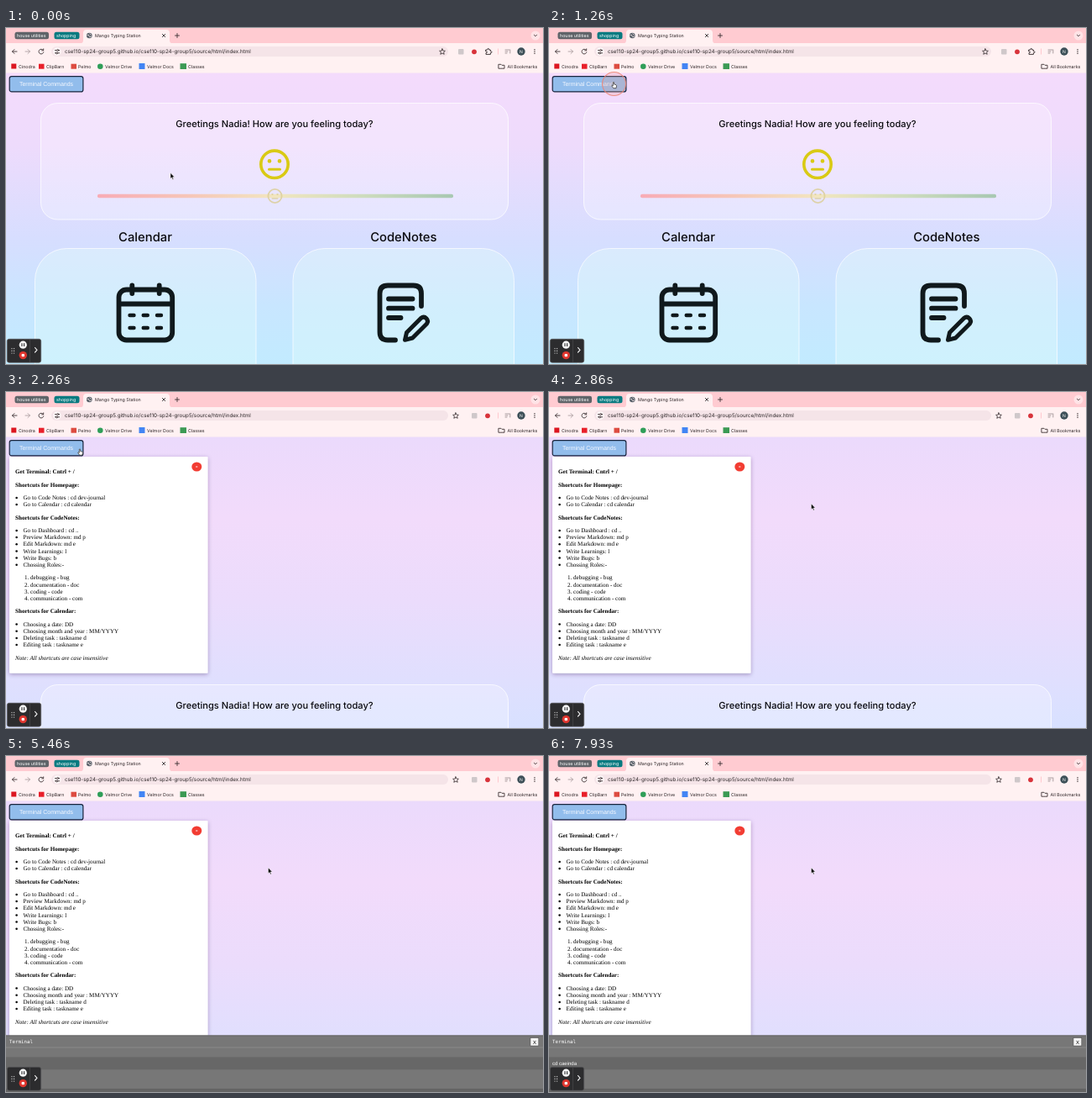
Animation, 640 px wide and 400 px high, one loop 8000 ms. Source, as an HTML page:

```html
<!DOCTYPE html>
<html lang="en">
<head>
<meta charset="utf-8">
<title>Terminal shortcuts</title>
<style>
html, body { margin: 0; width: 100%; height: 100%; overflow: hidden; background: #fff1f2; }
svg { position: absolute; left: 0; top: 0; display: block; }
text { white-space: pre; text-rendering: geometricPrecision; }
.ui { font-family: Inter, Roboto, sans-serif; font-size: 5.3px; fill: #2c2527; }
.head { font-family: Inter, "Open Sans", sans-serif; font-weight: 500; fill: #0b0b0f; text-anchor: middle; }
.arial { font-family: "Liberation Sans", Arial, sans-serif; }
.serif { font-family: "Liberation Serif", "Times New Roman", serif; font-size: 7.1px; fill: #000; }
.mono { font-family: "DejaVu Sans Mono", monospace; font-size: 5.8px; fill: #fff; }
.line { fill: none; stroke-linecap: round; stroke-linejoin: round; }
</style>
</head>
<body>
<svg id="stage" width="640" height="400" viewBox="0 0 640 400">
  <defs>
    <linearGradient id="home" gradientUnits="userSpaceOnUse" x1="0" y1="53" x2="0" y2="400">
      <stop offset="0" stop-color="#f4dbfc"/><stop offset=".25" stop-color="#eedbfc"/>
      <stop offset=".57" stop-color="#d7deff"/><stop offset=".8" stop-color="#c8e6ff"/>
      <stop offset="1" stop-color="#c2ebff"/>
    </linearGradient>
    <linearGradient id="tall" gradientUnits="userSpaceOnUse" x1="0" y1="53" x2="0" y2="400">
      <stop offset="0" stop-color="#ebdafc"/><stop offset=".28" stop-color="#f2dbfb"/>
      <stop offset=".57" stop-color="#ebdcfc"/><stop offset=".83" stop-color="#e0dffe"/>
      <stop offset="1" stop-color="#d8e1ff"/>
    </linearGradient>
    <linearGradient id="mood" gradientUnits="userSpaceOnUse" x1="109" y1="0" x2="533" y2="0">
      <stop offset="0" stop-color="#f8acb6"/><stop offset=".25" stop-color="#f6c5b8"/>
      <stop offset=".5" stop-color="#f2e6c0"/><stop offset=".75" stop-color="#cddcbe"/>
      <stop offset="1" stop-color="#a8c8b2"/>
    </linearGradient>
    <filter id="shadow" x="-10%" y="-10%" width="120%" height="120%">
      <feDropShadow dx="0" dy="1.5" stdDeviation="2.5" flood-color="#302050" flood-opacity=".35"/>
    </filter>
    <g id="face" fill="currentColor" stroke="currentColor">
      <circle r="16.2" fill="none" stroke-width="3.6"/>
      <g stroke="none"><circle cx="-6" cy="-3.900" r="2.300"/><circle cx="6" cy="-3.900" r="2.300"/></g>
      <path d="M-6.500 6H6.500" stroke-width="3" stroke-linecap="round"/>
    </g>
  </defs>

  <rect id="bg" y="53" width="640" height="347"/>

  <g id="page">
    <rect x="41.5" y="89.5" width="557" height="138.5" rx="20" fill="#fff" fill-opacity=".25" stroke="#fff" stroke-opacity=".75"/>
    <g fill="#e4fcf8" fill-opacity=".36" stroke="#fff" stroke-opacity=".7">
      <rect x="34.5" y="262.5" width="263.5" height="190" rx="38"/>
      <rect x="342" y="262.5" width="263.5" height="190" rx="38"/>
    </g>
    <text class="head" x="320" y="118" font-size="11.1">Greetings Nadia! How are you feeling today?</text>
    <use href="#face" transform="translate(320 162.300)" color="#d9ca14"/>
    <rect x="109" y="197.8" width="424" height="4.4" rx="2" fill="url(#mood)"/>
    <use href="#face" transform="translate(320.500 200) scale(.5)" color="#dccf9c" opacity=".85"/>
    <text class="head" x="166" y="254" font-size="14.8">Calendar</text>
    <text class="head" x="473.800" y="254" font-size="14.8">CodeNotes</text>
    <g class="line" stroke="#10191c" stroke-width="5.8">
      <rect x="134.500" y="311.500" width="63.700" height="60" rx="9"/>
      <path d="M135 328.500H198M150.300 306.500V316M182.700 306.500V316"/>
      <path stroke-width="4.4" d="M147.500 342H152.500M163.700 342H168.800M180 342H185M147.500 357H152.500M163.700 357H168.800M180 357H185"/>
      <path d="M464 371.500H455Q445.500 371.500 445.500 362V316Q445.500 306.500 455 306.500H485.500Q495 306.500 495 316V331"/>
      <path d="M456 322.500H484.500M456 333.700H484.500M456 345H470.500"/>
      <path stroke-width="5" d="M475.500 371.300L477.500 362.500L494.500 345.500Q498 342.800 501 345.800Q504 349 501.300 352.300L484.500 369Z"/>
    </g>
  </g>

  <g id="chrome">
    <rect width="640" height="20" fill="#ffcbd1"/>
    <rect y="18" width="640" height="35.500" fill="#fff1f2"/>
    <rect x="54" y="22" width="473" height="12" rx="6" fill="#f5e4e8"/>
    <circle cx="61" cy="28.100" r="4.800" fill="#fff6f7"/>
    <path d="M88 18.500Q92 18.500 92 14.500V6Q92 2 96 2H191Q195 2 195 6V14.500Q195 18.500 199 18.500Z" fill="#fff1f2"/>
    <rect x="10.500" y="4.700" width="40.500" height="8.600" rx="2.500" fill="#5f6368"/>
    <rect x="57.500" y="4.700" width="30" height="8.600" rx="2.500" fill="#087a80"/>
    <circle cx="99.300" cy="9" r="3.300" fill="#59616a"/>
    <path class="line" d="M97 8.300Q99 7.500 99 9.500T101.500 10.200M100 6.800L101 8" stroke="#fff1f2" stroke-width=".8"/>
    <circle cx="631" cy="9" r="5.500" fill="#ffe3e6"/>
    <g class="line" stroke="#332a2c" stroke-width=".85">
      <path d="M186.300 7.300L189.700 10.700M189.700 7.300L186.300 10.700M201.500 9H206.500M204 6.500V11.500"/>
      <path d="M629.400 8.200L631 9.800L632.600 8.200"/>
      <path d="M13 28H7.500M10 25.500L7.500 28L10 30.500"/>
      <path d="M23 28H28.500M26 25.500L28.500 28L26 30.500" stroke="#a99b9e"/>
      <path d="M44.200 26.200A2.900 2.900 0 1 0 44.800 28.800M44.700 24.800V26.800H42.700"/>
      <path d="M58.500 26.500H60.300M63 26.500H63.700M58.500 29.800H59.300M62 29.800H63.700"/>
      <circle cx="61.700" cy="26.500" r="1"/><circle cx="60.500" cy="29.800" r="1"/>
      <path d="M595 26H600M595 28H598M595 30H597M600.800 26V30" stroke="#9b8f92"/>
      <path d="M587.300 43.300H590L591 44.300H594V48.200H587.300Z"/>
    </g>
    <path d="M586.500 24.500V31.500" stroke="#ffc7ce"/>
    <g id="tools">
      <path class="line" d="M520 24.800L521 27.100L523.400 27.300L521.600 28.900L522.200 31.300L520 30L517.800 31.300L518.400 28.900L516.600 27.300L519 27.100Z" stroke="#332a2c" stroke-width=".8"/>
      <rect x="539" y="25" width="6.500" height="6.500" rx="1" fill="#cfc8ca"/>
      <circle cx="558" cy="28.300" r="2.900" fill="#d8343c"/>
    </g>
    <path id="puzzle" class="line" d="M572 26H573.700Q573.500 24.400 574.700 24.400T575.700 26H577.400V27.700Q579 27.600 579 28.700T577.400 29.700V31.400H572V29.700Q573.500 29.700 573.500 28.700T572 27.700Z" stroke="#332a2c" stroke-width=".9"/>
    <circle cx="614" cy="28" r="4.700" fill="#3c4f57"/>
    <g fill="#332a2c"><circle cx="630" cy="25.700" r=".7"/><circle cx="630" cy="28" r=".7"/><circle cx="630" cy="30.300" r=".7"/></g>
    <rect x="6.300" y="42.500" width="6" height="6" fill="#dc1620"/>
    <rect x="39" y="42.700" width="6.500" height="6" fill="#e8202a"/>
    <rect x="77.500" y="42.700" width="6.500" height="6" fill="#dd4b40"/>
    <circle cx="112.300" cy="45.700" r="3.300" fill="#2f9e58"/>
    <rect x="158.500" y="42" width="7" height="7" fill="#4285f4"/>
    <rect x="207.500" y="42.200" width="7.500" height="6.800" fill="#3b9a54"/>
  </g>

  <g id="button">
    <rect x="4.200" y="57.700" width="87.700" height="18.200" rx="2.500" fill="#92bdec" stroke="#18243c" stroke-width="1.200"/>
    <text class="arial" x="48" y="69" font-size="7" fill="#f6f9ff" text-anchor="middle">Terminal Commands</text>
  </g>

  <g id="help">
    <rect x="4" y="77" width="236.500" height="257.700" rx="1" fill="#fff" filter="url(#shadow)"/>
    <ellipse cx="227.300" cy="89" rx="6" ry="5.500" fill="#f23d33"/>
    <path d="M226.500 88.200L228.100 89.800M228.100 88.200L226.500 89.800" stroke="#fff" stroke-width=".7"/>
  </g>

  <g id="terminal">
    <rect y="332.500" width="640" height="67.500" fill="#777"/>
    <rect y="332.500" width="640" height="1" fill="#666"/>
    <rect y="346.500" width="640" height="1" fill="#8a8a8a"/>
    <rect y="358.500" width="640" height="14.800" fill="#676767"/>
    <rect y="396" width="640" height="4" fill="#646464"/>
    <text class="mono" x="4" y="342.300">Terminal</text>
    <rect x="625" y="335.700" width="9.800" height="9.300" fill="#f4f4f4" stroke="#4a4a4a" stroke-width=".5"/>
    <text class="arial" x="629.900" y="342.600" font-size="6" text-anchor="middle">X</text>
    <text id="typed" class="arial" x="4" y="368" font-size="6" fill="#fff"></text>
    <rect id="caret" y="362.300" width=".6" height="7.200" fill="#fff"/>
  </g>

  <g id="recorder">
    <rect x="1.300" y="370.300" width="40.400" height="28" rx="2.500" fill="#2c2c2e" stroke="#59595c" stroke-width=".7"/>
    <path d="M28.500 371V398" stroke="#48484b" stroke-width=".7"/>
    <circle cx="20.300" cy="377.200" r="4.600" fill="#f6f6f6"/>
    <path d="M19 375.300V379.100M21.600 375.300V379.100" stroke="#2c2c2e" stroke-width="1.100"/>
    <circle cx="20.300" cy="389.600" r="4.700" fill="#e0362f"/>
    <rect x="18.600" y="387.900" width="3.400" height="3.400" rx=".8" fill="#fff"/>
    <path class="line" d="M34.500 380.500L37 383.300L34.500 386.100" stroke="#fff" stroke-width="1.100"/>
  </g>

  <circle id="ring" cx="77.500" cy="66.500"/>
  <g id="arrow">
    <path d="M0 0V6.800L1.600 5.400L2.700 7.900L3.700 7.400L2.700 5H4.800Z" fill="#000" stroke="#fff" stroke-width=".5" stroke-linejoin="round"/>
  </g>
  <g id="hand">
    <path d="M-.7 -1.800Q.1 -2.500 .7 -1.700V.5L2.900 1.100Q3.700 1.500 3.500 2.500L3 5.200H-.2L-2.300 2.400Q-2.200 1.400 -1.300 1.900L-.7 2.400Z" fill="#fff" stroke="#222" stroke-width=".7" stroke-linejoin="round"/>
  </g>
</svg>
<script>
const $ = id => document.getElementById(id);
const NS = "http://www.w3.org/2000/svg";

function add(parent, tag, attrs, content) {
  const el = document.createElementNS(NS, tag);
  for (const k in attrs) el.setAttribute(k, attrs[k]);
  if (content) el.textContent = content;
  return parent.appendChild(el);
}

const label = (x, y, s, extra) => add($("chrome"), "text", { class: "ui", x, y, ...extra }, s);
label(13, 10.9, "house utilities", { style: "fill:#fff" });
label(60, 10.9, "shopping", { style: "fill:#fff" });
label(106, 10.9, "Mango Typing Station");
label(70, 30.2, "cse110-sp24-group5.github.io/cse110-sp24-group5/source/html/index.html", { style: "font-size:6.25px" });
label(614, 29.8, "N", { style: "fill:#fff;font-size:5px", "text-anchor": "middle" });
[[15, "Cinodra"], [48, "ClipBarn"], [86, "Pelmo"], [118, "Velmor Drive"], [168, "Velmor Docs"],
 [217, "Classes"], [597.5, "All Bookmarks"]].forEach(([x, s]) => label(x, 47.6, s));

// Prefixes: # heading, * bullet, digit numbered item, _ note
const lines = [
  "#Get Terminal: Cntrl + /", "#Shortcuts for Homepage:",
  "*Go to Code Notes : cd dev-journal", "*Go to Calendar : cd calendar",
  "#Shortcuts for CodeNotes:",
  "*Go to Dashboard : cd ..", "*Preview Markdown: md p", "*Edit Markdown: md e",
  "*Write Learnings: l", "*Write Bugs: b", "*Chossing Roles:-",
  "1debugging - bug", "2documentation - doc", "3coding - code", "4communication - com",
  "#Shortcuts for Calendar:",
  "*Choosing a date: DD", "*Choosing month and year : MM/YYYY",
  "*Deleting task : taskname d", "*Editing task : taskname e",
  "_Note: All shortcuts are case insensitive"
];
let y = 97.3, last = "";
for (const line of lines) {
  const kind = line[0], s = line.slice(1), numbered = kind > "0" && kind <= "9";
  const group = numbered ? "1" : kind;
  if (last) y += group === last && kind !== "#" ? 8.18 : 15.4;
  last = group;
  const item = kind === "*" || numbered;
  const x = numbered ? 29 : item ? 20.5 : 11;
  const put = (px, str) => add($("help"), "text", {
    class: "serif", x: px, y,
    "font-weight": kind === "#" ? 700 : 400,
    "font-style": kind === "_" ? "italic" : "normal"
  }, str);
  put(x, s);
  if (numbered) put(22, kind + ".");
  if (kind === "*") add($("help"), "circle", { cx: 12.6, cy: y - 2.2, r: 1.25 });
}

for (let i = 0; i < 6; i++)
  add($("recorder"), "circle", { cx: 7 + (i % 2) * 2.6, cy: 381.7 + (i >> 1) * 2.7, r: .65, fill: "#d5d5d5" });

const LOOP = 8000, OPEN = 1330, TERM = 4660, BLINK = 530;
const command = "cd caeinda";
const keys = [5730, 6000, 6060, 6460, 6600, 6700, 6800, 6930, 7130, 7400];
// time, x, y of the pointer
const path = [[0, 196, 172.5], [860, 77, 66.5], [2190, 77, 66.5], [2260, 88, 70], [2395, 88, 70], [2860, 312.5, 133], [LOOP, 312.5, 133]];

const show = (id, on) => $(id).setAttribute("visibility", on ? "visible" : "hidden");
const ease = p => p * p * (3 - 2 * p);

function pointer(t) {
  const i = path.findIndex((p, n) => n && t <= p[0]);
  const [t0, x0, y0] = path[i - 1], [t1, x1, y1] = path[i];
  const p = ease((t - t0) / (t1 - t0));
  return [x0 + (x1 - x0) * p, y0 + (y1 - y0) * p];
}

function draw(t) {
  const open = t >= OPEN, term = t >= TERM;
  $("bg").setAttribute("fill", open ? "url(#tall)" : "url(#home)");
  $("page").setAttribute("transform", `translate(0 ${open ? 259 : 0})`);
  show("help", open);
  show("terminal", term);
  $("tools").setAttribute("transform", `translate(${t >= 2200 ? 16 : 0} 0)`);
  show("puzzle", t < 2200);

  const [x, py] = pointer(t), over = x < 92 && py < 76;
  for (const id of ["arrow", "hand"]) $(id).setAttribute("transform", `translate(${x} ${py})`);
  show("hand", over);
  show("arrow", !over);

  const ring = $("ring"), down = t < 1300;
  show("ring", t >= 1060 && t < 1530);
  ring.setAttribute("r", down ? 6 + 8 * Math.min(1, Math.max(0, (t - 1060) / 190)) : 5.5);
  ring.setAttribute("fill", down ? "rgba(235,160,150,.3)" : "none");
  ring.setAttribute("stroke", down ? "#ee8676" : "#7d7480");
  ring.setAttribute("stroke-width", down ? 1.1 : .8);
  ring.setAttribute("opacity", down ? .9 : Math.max(0, 1 - Math.max(0, t - 1350) / 180));

  const n = keys.filter(k => t >= k).length;
  const typed = $("typed");
  typed.textContent = command.slice(0, n);
  const since = t - (n ? keys[n - 1] : TERM);
  show("caret", term && Math.floor(since / BLINK) % 2 === 0);
  $("caret").setAttribute("x", 4.3 + (n ? typed.getComputedTextLength() : 0));
}

const start = performance.now();
function tick() {
  draw((performance.now() - start) % LOOP);
  requestAnimationFrame(tick);
}
tick();
</script>
</body>
</html>
```
